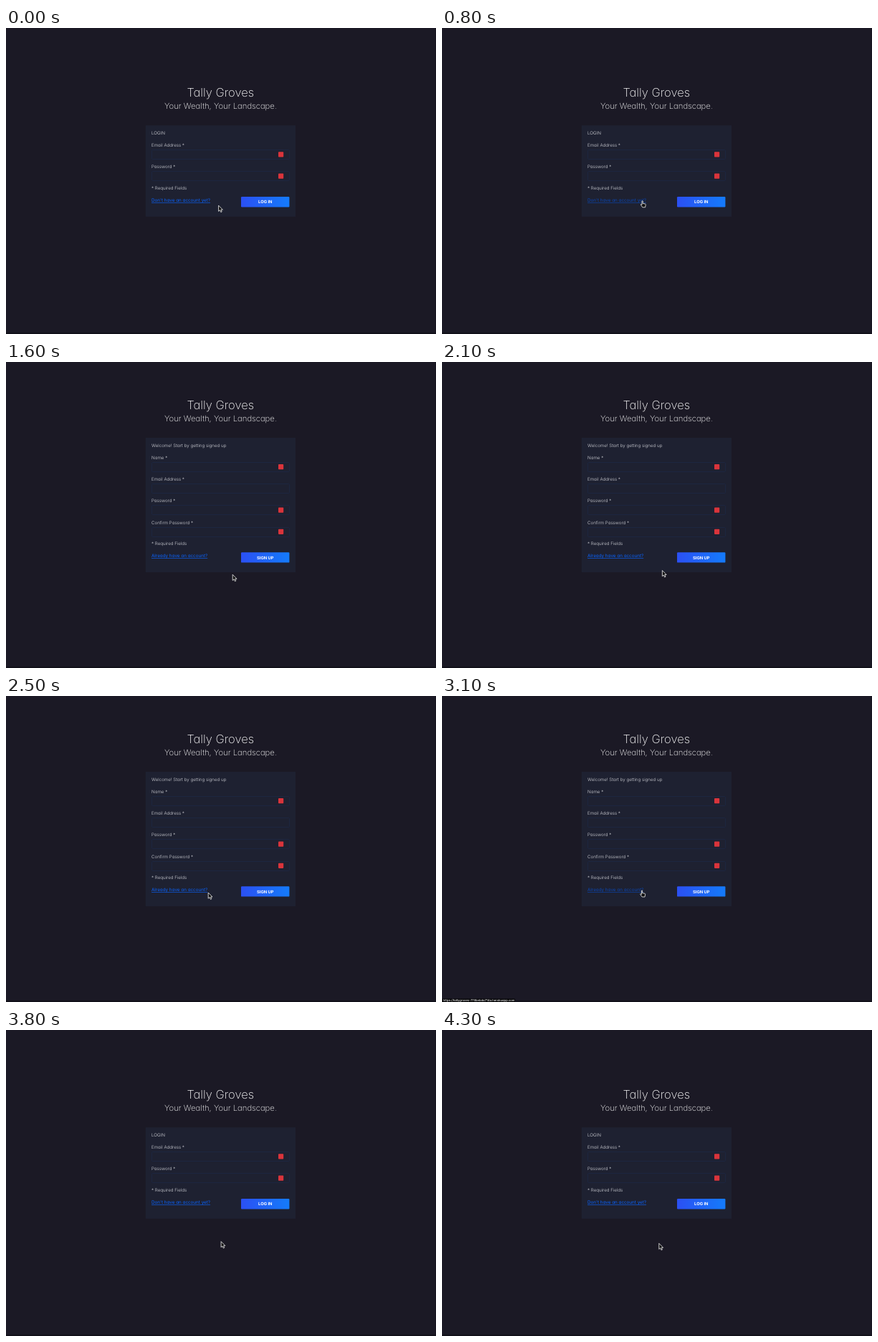
Recreate the animation shown at these times as an HTML page. Size 600 by 428 pixels, loop 5000 ms.

```html
<!DOCTYPE html>
<html lang="en">
<head>
<meta charset="utf-8">
<title>Login and sign up</title>
<style>
  html, body { margin: 0; width: 100%; height: 100%; overflow: hidden; background: #1b1925; }
  svg { display: block; width: 100vw; height: 100vh; }
  text {
    font: 300 6.2px Inter, sans-serif; font-feature-settings: "cv11";
    text-rendering: geometricPrecision; fill: #d6d7dc;
  }
  .title { font-size: 16.5px; font-weight: 250; fill: #fff; text-anchor: middle; }
  .tagline { font-size: 11.3px; font-weight: 250; fill: #fff; text-anchor: middle; }
  .link { font-size: 6.3px; font-weight: 400; fill: #0a63ff; text-decoration: underline; text-decoration-thickness: .6px; }
  .link.hover { fill: #0b47b4; }
  .button { font-size: 5.8px; font-weight: 700; fill: #fff; text-anchor: middle; }
  .url { font-size: 4.15px; font-weight: 500; fill: #f0f0f2; }
  .card { fill: #1e2131; }
  .input { fill: none; stroke: #1e2947; stroke-width: .7; }
  .icon { fill: #d9343b; }
  .cursor { fill: #111; stroke: #f4f4f4; stroke-width: .8; stroke-linejoin: round; }
</style>
</head>
<body>
<svg id="stage" viewBox="0 0 600 428" preserveAspectRatio="none">
  <defs>
    <linearGradient id="blue">
      <stop stop-color="#2b50f3"/><stop offset="1" stop-color="#147bfb"/>
    </linearGradient>
  </defs>
  <rect width="600" height="428" fill="#1b1925"/>
  <path d="M0 427H600" stroke="#12111a" stroke-width="2"/>
  <path d="M599.5 0V428" stroke="#15141e"/>
</svg>
<script>
const stage = document.getElementById("stage");

function add(parent, tag, attrs, text = "") {
  const node = document.createElementNS("http://www.w3.org/2000/svg", tag);
  for (const key in attrs) node.setAttribute(key, attrs[key]);
  node.textContent = text;
  return parent.appendChild(node);
}
const label = (parent, text, x, y, cls = "") => add(parent, "text", { x, y, class: cls }, text);
const box = (parent, x, y, width, height, cls, rx = 0) =>
  add(parent, "rect", { x, y, width, height, rx, class: cls });
const show = (node, on) => node.setAttribute("visibility", on ? "visible" : "hidden");

function makePage({ top, heading, fields, link, button, iconRows }) {
  const root = add(stage, "g", {});
  const end = top + 67.3 + 30.2 * fields.length;
  label(root, "Tally Groves", 299.3, top - 40.4, "title");
  label(root, "Your Wealth, Your Landscape.", 299.5, top - 23, "tagline");
  box(root, 194.8, top, 209.2, end - top, "card");
  label(root, heading, 203, top + 12.8);
  fields.forEach((name, i) => {
    const y = top + 30 + i * 30.2;
    label(root, name + " *", 203, y);
    box(root, 203.5, Math.round(y) + 4.5, 192, 13, "input", 1);
  });
  label(root, "* Required Fields", 203, end - 37.9);
  const linkNode = label(root, link, 203, end - 20.8, "link");
  box(root, 328, end - 27.8, 67.4, 14.3, "", 1.2).setAttribute("fill", "url(#blue)");
  label(root, button, 361.8, end - 18.6, "button");
  const icons = add(root, "g", {});
  for (const i of iconRows) box(icons, 380, top + 37.1 + i * 30.2, 7.2, 7.2, "icon", .8);
  return { root, icons, link: linkNode };
}

function makeStatus(url, width) {
  const bar = add(stage, "g", {});
  box(bar, 0, 423.4, width, 4.6, "", .8).setAttribute("fill", "#020203");
  label(bar, url, 1.6, 427.4, "url");
  return bar;
}

const login = makePage({
  top: 136.2, heading: "LOGIN", fields: ["Email Address", "Password"],
  link: "Don't have an account yet?", button: "LOG IN", iconRows: [0, 1]
});
const signup = makePage({
  top: 106, heading: "Welcome! Start by getting signed up",
  fields: ["Name", "Email Address", "Password", "Confirm Password"],
  link: "Already have an account?", button: "SIGN UP", iconRows: [0, 2, 3]
});

const host = "https://tallygroves-778bebda714a.herokuapp.com";
const signupStatus = makeStatus(host + "/signup", 117);
const loginStatus = makeStatus(host, 102);

const cursor = add(stage, "path", { class: "cursor" });
const shapes = {
  arrow: "M0 0V8.2L1.9 6.5 3.2 9.4 4.6 8.8 3.4 6H5.8Z",
  hand: "M-.6 .6Q0 -.2 .6 .6V4L4 4.7Q4.8 5 4.6 6L4 9.4H.2L-2.2 6Q-2.6 4.8 -1.4 5.2L-.6 6Z",
  beam: "M-2 -4.2H2V-3.4H.5V3.4H2V4.2H-2V3.4H-.5V-3.4H-2Z"
};

// time, x, y
const path = [
  [0, 296.6, 248.2], [600, 279.6, 241.4], [1100, 279.6, 241.4], [1200, 281, 243.3],
  [1600, 316.2, 297.3], [1900, 316.2, 297.3], [2500, 282.2, 275],
  [2800, 279, 271.6], [3300, 279, 271.6], [3400, 277, 273],
  [3900, 302.8, 298.4], [5000, 302.8, 298.4]
];

function cursorAt(t) {
  const i = path.findIndex(key => key[0] > t);
  const [t0, x0, y0] = path[i - 1], [t1, x1, y1] = path[i];
  const p = (t - t0) / (t1 - t0), ease = p * p * (3 - 2 * p);
  return [x0 + (x1 - x0) * ease, y0 + (y1 - y0) * ease];
}

function draw(now) {
  const t = Math.floor(now % 5000 / 100) * 100;
  const within = (from, to) => t >= from && t < to;
  const onSignup = within(1100, 3400);
  const hand = within(500, 1200) || within(2700, 3400);

  show(login.root, !onSignup);
  show(signup.root, onSignup);
  // Icons need explicit hiding, since a visible child overrides a hidden parent.
  show(login.icons, t < 1100 || t >= 3800);
  show(signup.icons, within(1400, 3400));
  login.link.classList.toggle("hover", within(500, 1100));
  signup.link.classList.toggle("hover", within(2700, 3400));

  show(signupStatus, within(900, 1300));
  signupStatus.setAttribute("opacity", t < 1200 ? 1 : .6);
  show(loginStatus, within(3000, 3600));
  loginStatus.setAttribute("opacity", t < 3500 ? 1 : .5);

  const shape = hand ? "hand" : within(1200, 1300) ? "beam" : "arrow";
  cursor.setAttribute("d", shapes[shape]);
  cursor.setAttribute("stroke-opacity", shape === "beam" ? .5 : 1);
  cursor.setAttribute("transform", `translate(${cursorAt(t)})`);
  requestAnimationFrame(() => draw(performance.now()));
}
draw(0);
</script>
</body>
</html>
```
